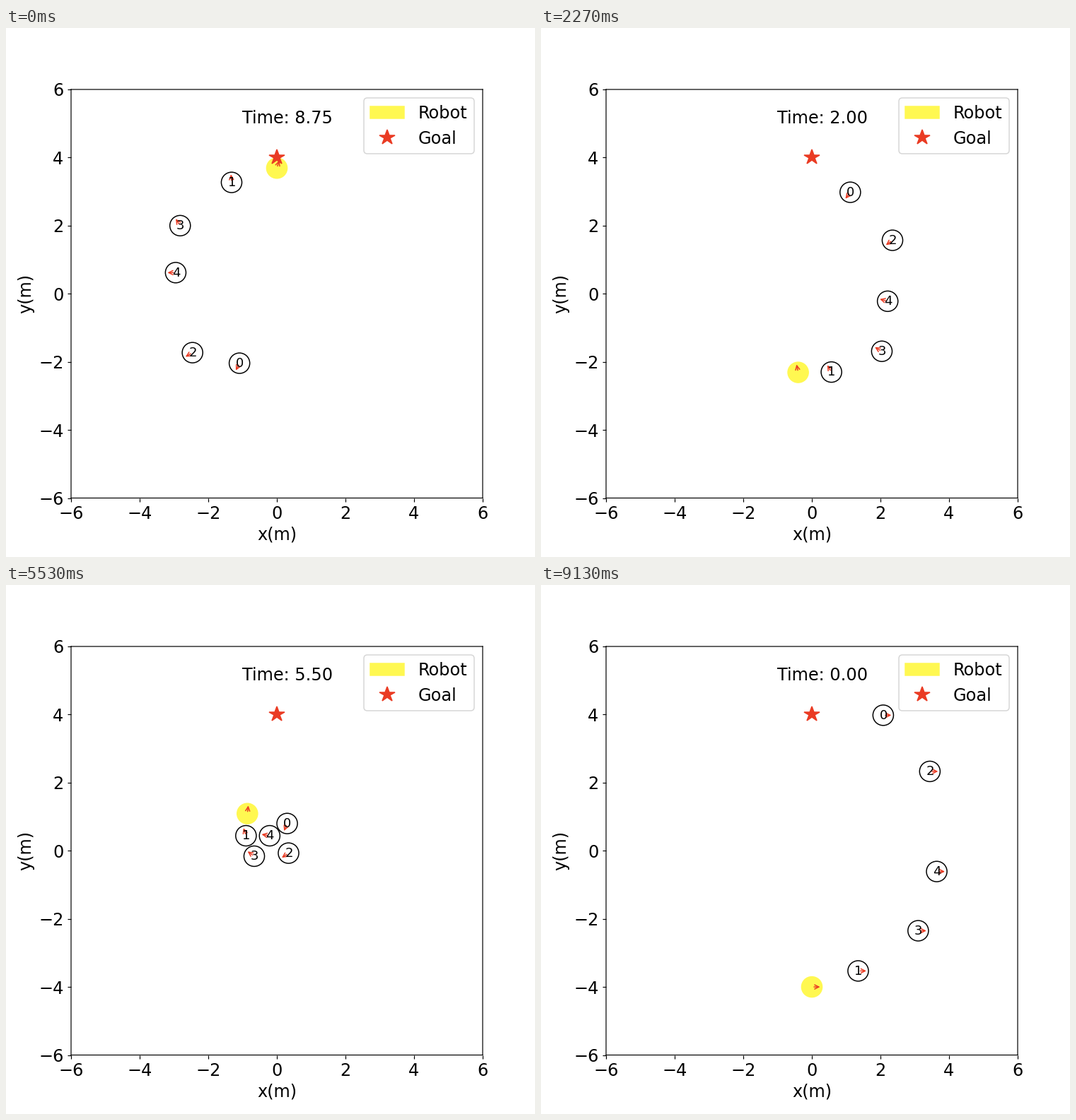
These frames come from a looping animation (748 px wide and 749 px high, 9.34 s). A matplotlib script:

```python
import numpy as np
import matplotlib.pyplot as plt
from matplotlib.animation import FuncAnimation
from matplotlib.lines import Line2D
from matplotlib.patches import ArrowStyle, Circle, FancyArrowPatch

W, H, DPI = 748, 749, 108
LEFT, RIGHT, TOP, BOTTOM = 92, 674, 87, 665.5
LIMIT, RADIUS = 6, 0.3
YELLOW, RED = "#fff851", "#ea3b23"

FRAMES, LOOP_MS = 280, 9340
INTERVAL = LOOP_MS / FRAMES
TICK_MS, STEP_MS, FIRST_STEP_MS = 1000 / 15, 249.77, 37.5
DT, STEPS = 0.25, 36

# A few key points in metres: the robot first, then agents 0 to 4.
KEY_TIMES = np.array([0, 2, 5.5, 7.75, 8.75])
KEY_POINTS = np.array([
    [(0, -4), (-0.4, -2.31), (-0.86, 1.09), (-0.15, 3.22), (0, 3.69)],
    [(2.08, 3.98), (1.12, 2.98), (0.3, 0.8), (-0.64, -1.15), (-1.09, -2.04)],
    [(1.35, -3.53), (0.57, -2.3), (-0.9, 0.44), (-1.26, 2.66), (-1.32, 3.27)],
    [(3.44, 2.33), (2.35, 1.57), (0.34, -0.07), (-1.6, -1.22), (-2.46, -1.73)],
    [(3.1, -2.35), (2.04, -1.69), (-0.66, -0.16), (-2.32, 1.31), (-2.82, 2)],
    [(3.64, -0.61), (2.21, -0.22), (-0.21, 0.44), (-1.96, 0.61), (-2.95, 0.62)],
])


def hermite(times, points, t):
    """Smooth path through points (n, 2), evaluated at every t."""
    slopes = np.gradient(points, times, axis=0, edge_order=2)
    i = np.clip(np.searchsorted(times, t, side="right") - 1, 0, len(times) - 2)
    span = (times[i + 1] - times[i])[:, None]
    u = (t - times[i])[:, None] / span
    return ((1 + 2 * u) * (1 - u) ** 2 * points[i]
            + u * (1 - u) ** 2 * span * slopes[i]
            + u ** 2 * (3 - 2 * u) * points[i + 1]
            + u ** 2 * (u - 1) * span * slopes[i + 1])


paths = [hermite(KEY_TIMES, p, np.arange(STEPS) * DT) for p in KEY_POINTS]


def heading(path, step):
    """Direction of the last move; everyone faces right at the start."""
    if step == 0:
        return np.array([1.0, 0.0])
    move = path[step] - path[step - 1]
    return move / np.hypot(*move)


def step_at(frame):
    """Simulation step caught by the newest capture within this frame."""
    end = (frame + 1) * INTERVAL - 0.1
    captured = end // TICK_MS * TICK_MS
    return int((captured - FIRST_STEP_MS) // STEP_MS) % STEPS


fig = plt.figure(figsize=(W / DPI, H / DPI), dpi=DPI, facecolor="white")
ax = fig.add_axes([LEFT / W, 1 - BOTTOM / H,
                   (RIGHT - LEFT) / W, (BOTTOM - TOP) / H])
ax.set(xlim=(-LIMIT, LIMIT), ylim=(-LIMIT, LIMIT),
       xticks=range(-6, 7, 2), yticks=range(-6, 7, 2))
ax.tick_params(labelsize=16)
ax.set_xlabel("x(m)", fontsize=16)
ax.set_ylabel("y(m)", fontsize=16)
for spine in ax.spines.values():
    spine.set_snap(False)
fig.add_artist(Line2D([0, 1], [0.5 / H] * 2, color="#e4e4e6",
                      linewidth=72 / DPI))

robot = ax.add_patch(Circle((0, -4), RADIUS, color=YELLOW))
agents = [ax.add_patch(Circle((0, 0), RADIUS, fill=False)) for _ in range(5)]
bodies = [robot] + agents
goal, = ax.plot([0], [4], color=RED, marker="*", linestyle="None",
                markersize=15)
ax.legend([robot, goal], ["Robot", "Goal"], fontsize=16, loc="upper right")

head = ArrowStyle("->", head_length=4, head_width=2)
arrows = [ax.add_patch(FancyArrowPatch((0, 0), (RADIUS, 0), color=RED,
                                       arrowstyle=head, mutation_scale=1))
          for _ in bodies]
digits = [ax.text(0, 0, str(i), fontsize=12) for i in range(5)]
clock = ax.text(-1, 5, "", fontsize=16)


def update(frame):
    step = step_at(frame)
    for path, body, arrow in zip(paths, bodies, arrows):
        pos = path[step]
        body.center = tuple(pos)
        arrow.set_positions(pos, pos + RADIUS * heading(path, step))
    for path, digit in zip(paths[1:], digits):
        digit.set_position(path[step] - 0.11)
    clock.set_text(f"Time: {step * DT:.2f}")
    return [*bodies, *arrows, *digits, clock]


anim = FuncAnimation(fig, update, frames=FRAMES, interval=INTERVAL,
                     repeat=True, repeat_delay=0, blit=False)
plt.show()
```
